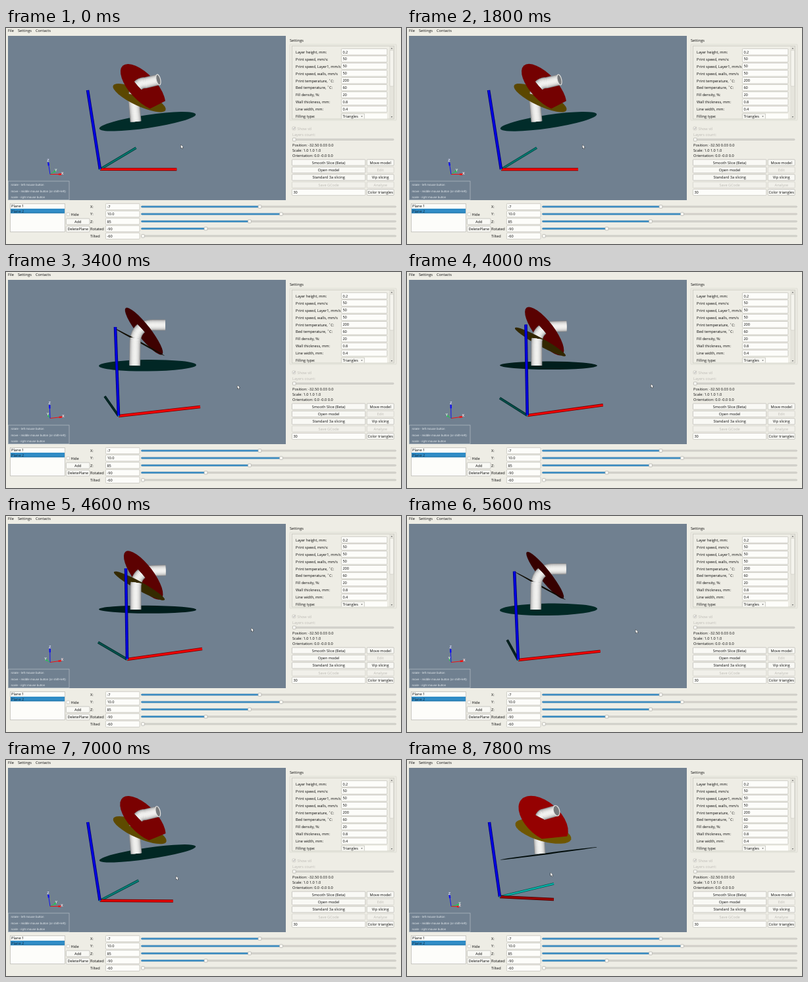
An HTML page with a canvas that plays this animation: 600x330 px, repeating every 8000 ms.

```html
<!DOCTYPE html>
<html lang="en">
<head>
<meta charset="utf-8">
<title>Slicer</title>
<style>
  html, body { margin: 0; width: 600px; height: 330px; overflow: hidden; background: #eeede5; }
  svg, canvas { position: absolute; left: 0; top: 0; }
  text { font: 500 5.65px "Open Sans", sans-serif; fill: #0c0c0c; text-rendering: geometricPrecision; }
  .off { fill: #bdbbb5; }
  .mid { text-anchor: middle; }
  .picked { fill: #10283c; }
  .hint { font: 4.5px "Liberation Sans", sans-serif; fill: #e4e9ee; }
</style>
</head>
<body>
<svg id="ui" width="600" height="330"></svg>
<canvas id="view" width="600" height="330"></canvas>
<script>
// ---- static interface ----
const text = (x, y, s, cls = '') => `<text x="${x}" y="${y + 2.1}" class="${cls}">${s}</text>`;
const box = (x, y, w, h, fill = '#fdfdfa', line = '#bfbeb7', r = 1) =>
  `<rect x="${x}" y="${y}" width="${w}" height="${h}" rx="${r}" fill="${fill}" stroke="${line}" stroke-width=".7"/>`;
const arrow = (x, y, dir = 1) => `<path d="M${x - 1.2} ${y - dir * .8}h2.4l-1.2 ${1.6 * dir}z" fill="#444"/>`;
const field = (x, y, w, value) => box(x, y - 4.7, w, 9.4) + text(x + 2, y, value);
const button = (x, y, w, label, off) =>
  box(x, y - 4.6, w, 9.2, off ? '#f1f0ea' : '#f9f9f5', off ? '#d0cec8' : '#b7b5af') +
  text(x + w / 2, y, label, off ? 'mid off' : 'mid');
const slider = (x, y, w, knob) =>
  box(x, y - 1, w, 2, '#d8d7d0', '#c2c1ba') +
  (knob > x + 5 ? box(x, y - 1, knob - x, 2, '#3a8fc8', '#3a86b8') : '') +
  box(knob - 2.4, y - 2.4, 4.8, 4.8, '#fafaf6', '#aeaca6');

const settings = [
  ['Layer height, mm:', '0.2'], ['Print speed, mm/s:', '50'], ['Print speed, Layer1, mm/s', '50'],
  ['Print speed, walls, mm/s', '50'], ['Print temperature, ˚C:', '200'], ['Bed temperature, ˚C:', '60'],
  ['Fill density, %:', '20'], ['Wall thickness, mm:', '0.8'], ['Line width, mm:', '0.4']
];
const planeRows = [['X:', '-7', 385.5], ['Y:', '10.0', 418], ['Z:', '85', 370],
  ['Rotated', '-90', 303.5], ['Tilted', '-60', 208]];
const actions = [['Smooth Slice (Beta)', 'Move model'], ['Open model', 'Edit', 0, 1],
  ['Standard 3a slicing', 'Vip slicing'], ['Save GCode', 'Analyze', 1, 1]];

document.getElementById('ui').innerHTML = [
  text(3, 4.3, 'File'), text(18, 4.3, 'Settings'), text(45, 4.3, 'Contacts'),
  '<path d="M3 12h422v251H3z" fill="#708090"/>',
  box(3.4, 234, 92.6, 28.6, 'none', '#b4bec7', 0),
  text(7.5, 239, 'rotate - left mouse button', 'hint'),
  text(7.5, 248.5, 'move - middle mouse button (or shift+left)', 'hint'),
  text(7.5, 257.5, 'scale - right mouse button', 'hint'),

  text(431, 19.3, 'Settings'),
  box(431, 25, 162, 116, '#ebeae2', '#d8d7cf'), box(434.5, 27.5, 155, 111.5, '#eeede5', '#c6c5bd', 0),
  settings.map(([label, value], i) => field(509.4, 36.4 + i * 10.95, 69.5, value) + text(440, 36.6 + i * 10.95, label)).join(''),
  text(440, 135, 'Filling type:'),
  '<path d="M544.4 138.6v-7.6h34.5v7.6" fill="#fdfdfa"/>',
  '<path d="M509.4 138.6v-7.6h35v7.6" fill="#f9f9f5" stroke="#bfbeb7" stroke-width=".7"/>',
  text(511.4, 135, 'Triangles'), arrow(540.5, 135.2),
  box(583, 28, 5.8, 110.5, '#e6e5dd', '#dad9d1', 0), box(583, 34, 5.8, 55, '#f5f4ee', '#cccbc3'),
  arrow(585.9, 31, -1), arrow(585.9, 136),

  box(435, 151, 4.8, 4.8, '#f4f3ed', '#c4c2bb'), '<path d="M436 153.4l1.2 1.2 1.8-2.8" fill="none" stroke="#aaa"/>',
  text(442.5, 153.4, 'Show stl', 'off'), text(435, 162.6, 'Layers count:', 'off'),
  slider(435.5, 170.4, 153.5, 437.8),
  text(435, 178.8, 'Position: -32.50 0.03 0.0'), text(435, 186.8, 'Scale: 1.0 1.0 1.0'),
  text(435, 195, 'Orientation: 0.0 -0.0 0.0'),
  actions.map(([a, b, offA, offB], i) =>
    button(434.4, 205.5 + i * 11.4, 111.4, a, offA) + button(548.2, 205.5 + i * 11.4, 41, b, offB)).join(''),
  field(434.4, 251, 111.4, '30'), button(548.2, 251, 41, 'Color triangles'),

  box(6.4, 268.4, 83.2, 43, '#fdfdfa', '#b7b5af', 0), text(8, 272.3, 'Plane 1'),
  '<path d="M7 276h82v7.2H7z" fill="#308cc6"/><path d="M8 282.4h80" stroke="#1c4f70" stroke-width=".7" stroke-dasharray="1"/>',
  text(8, 279.4, 'Plane 2', 'picked'),
  box(92, 282.2, 4.6, 4.6), text(98.5, 284.4, 'Hide'),
  button(91.4, 295.7, 35.6, 'Add'), button(91.4, 307.2, 35.6, 'DeletePlane'),
  planeRows.map(([label, value, knob], i) => {
    const y = 273 + i * 11.2;
    return text(128, y, label) + field(151.4, y, 51.6, value) + slider(205.5, y, 387, knob);
  }).join('')
].join('');

// ---- 3D view: the pose follows the dragged cursor ----
// axes: origin, blue, red and teal tips; discs: tilt radius (sign = visible side) and angle;
// tube: foot x, bend x, bend y, mouth x, mouth y, mouth opening
const poses = [
  { tip: [217.5, 171.5], axes: [141, 209, 125, 95, 223, 213, 223, 189], green: [.9, -7.5], yellow: [207, 15, 16], red: [26, 42], tube: [202, 200, 83, 227, 77.5, 4.6] },
  { tip: [266, 178], axes: [143, 216, 124, 95, 260, 216, 197, 183], green: [10.2, -8.5], yellow: [202.5, 12, 25.5], red: [20, 47], tube: [197, 194, 83.5, 231.5, 79, 3.2] },
  { tip: [295, 173.5], axes: [147, 216, 135, 88, 277, 211, 177, 187], green: [9.8, -6], yellow: [203, 6.5, 27], red: [7.5, 51], tube: [196, 193.5, 81, 238, 80, 1.2] },
  { tip: [315, 176], axes: [153, 220, 141, 90, 283, 211, 169, 185], green: [12.2, -3.5], yellow: [202.5, 4, 29], red: [2, 51.5], tube: [195.5, 195, 80, 239, 79.5, 0] },
  { tip: [351, 172.5], axes: [171, 220, 166, 84, 295, 206, 150, 190], green: [8.8, -.5], yellow: [202.5, -1.2, 29], red: [-10, 52], tube: [195.5, 196, 81, 242, 81, 0] },
  { tip: [372, 170.5], axes: [184, 219, 182, 80, 298, 203, 140, 193], green: [6, .3], yellow: [202.5, -6.5, 29], red: [-15.5, 53], tube: [197, 197, 83.5, 242.5, 83, 0] }
];
const drag = [[0, 265], [400, 265], [600, 266], [1800, 266], [2800, 315], [3400, 351], [4000, 370],
  [4600, 372], [5000, 372], [5200, 370], [6200, 312], [6400, 295], [7400, 233], [7800, 217.5]];

const segment = (keys, value, pos) => {
  let i = 0;
  while (i < keys.length - 2 && value >= pos(keys[i + 1])) i++;
  const a = keys[i], b = keys[i + 1];
  const u = Math.max(0, Math.min(1, (value - pos(a)) / (pos(b) - pos(a))));
  return [a, b, u];
};
const mix = (a, b, u) => a + (b - a) * u;
const ctx = document.getElementById('view').getContext('2d');

function poseAt(time) {
  const [from, to, k] = segment(drag, time, d => d[0]);
  const x = mix(from[1], to[1], k);
  const [a, b, u] = segment(poses, x, p => p.tip[0]);
  const pose = {};
  for (const key in a) pose[key] = a[key].map((v, i) => mix(v, b[key][i], u));
  pose.tip[0] = x;
  return pose;
}

function line(points, width, color) {
  ctx.beginPath();
  points.forEach(p => ctx.lineTo(...p));
  ctx.lineWidth = width;
  ctx.strokeStyle = color;
  ctx.stroke();
}

function disc(cx, cy, radius, tilt, deg, rgb, start = 0, end = 7) {
  const light = Math.abs(tilt) / radius + .03;
  ctx.beginPath();
  ctx.ellipse(cx, cy, radius, Math.max(1.1, Math.abs(tilt)), deg * Math.PI / 180, start, end);
  ctx.fillStyle = `rgb(${rgb.map(c => c * light)})`;
  ctx.fill();
}

function tubePart(points) {
  [[17, '#808285'], [15.6, '#b4b4b4'], [13, '#d6d6d5'], [9, '#ebebe9'], [4.5, '#f5f5f3']]
    .forEach(([w, c]) => line(points, w, c));
  ctx.setLineDash([.6, 1.4]);
  line(points, 15, 'rgba(90,90,90,.1)');
  ctx.setLineDash([]);
}

function drawModel({ green, yellow, red, tube }) {
  const [footX, bendX, bendY, endX, endY, opening] = tube;
  const path = [[footX, 143]];
  for (let i = 0; i <= 12; i++) {
    const u = i / 12, v = 1 - u;
    path.push([v * v * bendX + 2 * u * v * bendX + u * u * (endX - 19),
      v * v * 110 + 2 * u * v * bendY + u * u * bendY]);
  }
  path.push([endX, endY]);

  const low = () => tubePart(path.slice(0, 4));
  const middle = () => tubePart(path.slice(3, 9));
  const top = () => {
    tubePart(path.slice(8));
    if (opening < .3) return;
    ctx.beginPath();
    ctx.ellipse(endX, endY, opening, 8.2, Math.atan2(endY - bendY, 19), 0, 7);
    ctx.fillStyle = '#77797b';
    ctx.fill();
    ctx.lineWidth = 1.2;
    ctx.strokeStyle = '#e2e2e0';
    ctx.stroke();
  };
  const yellowDisc = () => disc(yellow[0], 107 + (yellow[0] - 203) / 2, 44, yellow[1], yellow[2], [300, 235, 0]);
  const redDisc = () => {
    // seen from above, the cap beyond the yellow plane is hidden
    const skew = Math.max(0, red[0] - 18) * .06;
    const arc = red[0] > 0 ? [skew + .67, skew - .67 + 2 * Math.PI] : [0, 7];
    disc(211 - .15 * Math.abs(red[0]), 90.5, 45, ...red, [245, 2, 2], ...arc);
  };

  disc(215, 142.8, 74, ...green, [4, 265, 248]);
  const lower = yellow[1] > 0 ? [low, yellowDisc, middle] : [middle, yellowDisc, low];
  const order = red[0] > 0 ? [...lower, redDisc, top] : [top, redDisc, ...lower];
  order.forEach(draw => draw());
}

function drawAxes([ox, oy, ...tips]) {
  const [blue, red, teal] = [0, 2, 4].map(i => [tips[i] - ox, tips[i + 1] - oy]);
  const r = Math.min(240, 150 + (Math.hypot(...red) - 82) * 2.6);
  const g = Math.max(36, Math.hypot(...teal) * 2.9 - 65);
  const axis = ([dx, dy], width, rgb) => {
    const points = [[ox, oy], [ox + dx, oy + dy]];
    line(points, width, `rgb(${rgb.map(c => c * .5)})`);
    line(points, width - 1.6, `rgb(${rgb})`);
  };
  axis(teal, 3.8, [0, g, g * .94]);
  axis(red, 4.4, [r, 0, 0]);
  axis(blue, 4.6, [0, 0, 225]);
  ctx.fillStyle = '#0a8a80';
  ctx.fillRect(ox - 1, oy - 1, 2, 2);

  // corner triad
  ctx.font = 'bold 5.5px "Liberation Sans", sans-serif';
  ctx.textAlign = 'center';
  ctx.textBaseline = 'middle';
  [[teal, '#20c850', 'Y', '#dcf4e0'], [red, '#f01010', 'X', '#ffdede'], [blue, '#1010f0', 'Z', '#dcdcff']]
    .forEach(([[dx, dy], color, name, ink]) => {
      const along = k => [67 + dx * k, 223.5 + dy * k];
      line([along(0), along(.14)], 1, color);
      line([along(.11), along(.15)], 2.4, color);
      const [x, y] = along(.16);
      ctx.fillStyle = ink;
      ctx.fillText(name, x, y - 1.2);
    });
}

function drawCursor([x, y]) {
  ctx.beginPath();
  [[0, 0], [0, 5], [1.2, 4], [2, 5.9], [2.9, 5.5], [2.1, 3.7], [3.6, 3.6]]
    .forEach(([dx, dy]) => ctx.lineTo(x + .6 + dx, y + .6 + dy));
  ctx.closePath();
  ctx.lineWidth = .9;
  ctx.strokeStyle = '#222';
  ctx.stroke();
  ctx.fillStyle = '#fff';
  ctx.fill();
}

function frame() {
  const time = Math.floor(performance.now() % 8000 / 200) * 200;
  const pose = poseAt(time);
  ctx.clearRect(0, 0, 600, 330);
  drawModel(pose);
  drawAxes(pose.axes);
  drawCursor(pose.tip);
  requestAnimationFrame(frame);
}
frame();
</script>
</body>
</html>
```
